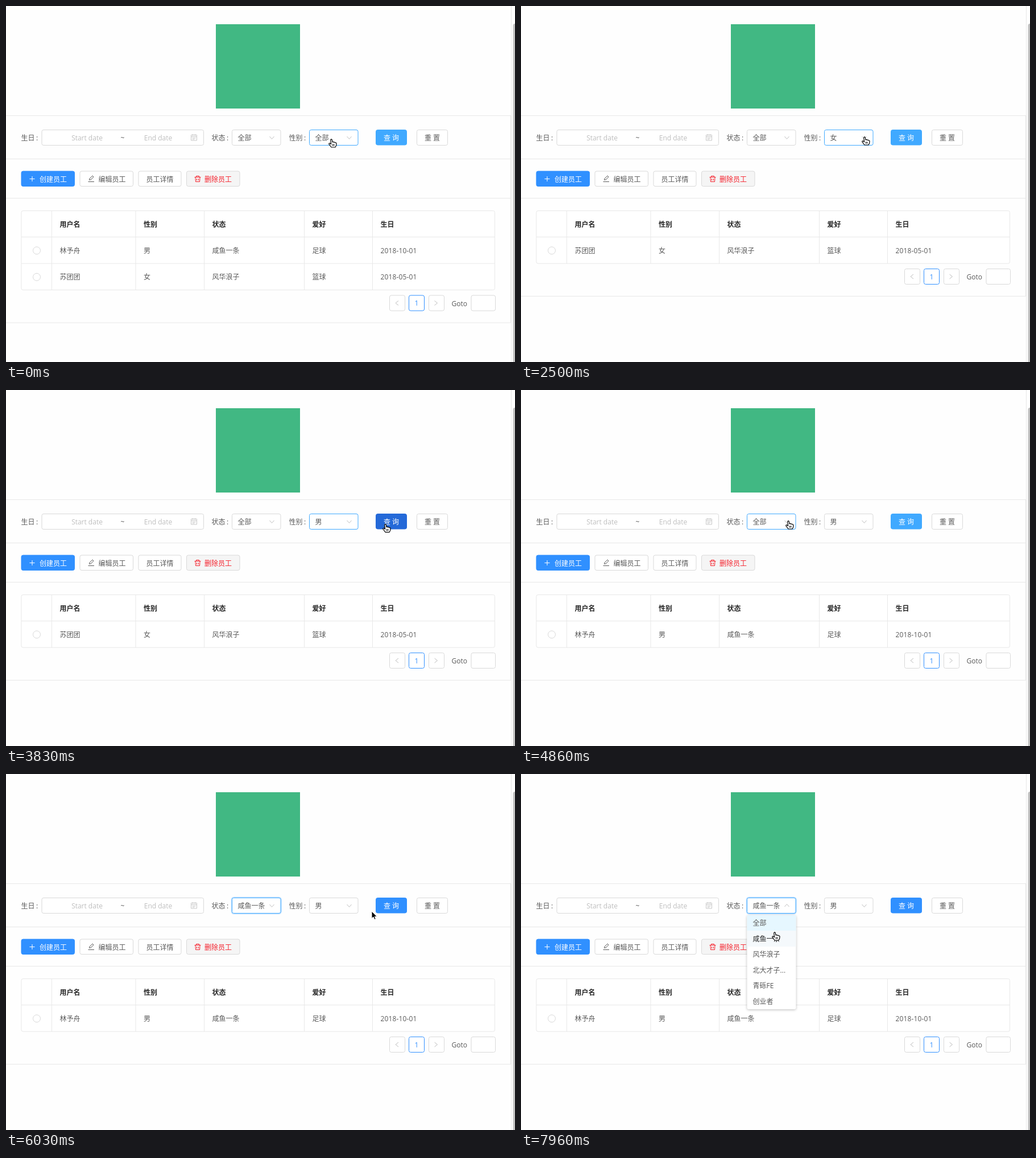
An HTML page that plays this animation: 895 by 625 pixels, repeating every 8 s.

```html
<!DOCTYPE html>
<html lang="zh-CN">
<head>
<meta charset="utf-8">
<title>员工列表</title>
<style>
html, body { margin: 0; width: 100%; height: 100%; overflow: hidden; background: #fefefe; }
svg { display: block; }
text { font: 12px "Open Sans", "Noto Sans CJK SC", "Noto Sans CJK", sans-serif; white-space: pre; }
</style>
</head>
<body>
<svg id="stage" width="895" height="625" viewBox="0 0 895 625"></svg>
<script>
const STEP = 147.2, LOOP = 8000;
const GREY = '#d9d9d9', LINE = '#e8e8e8', INK = '#595959', DARK = '#262626', BLUE = '#3090ff', SKY = '#40a9ff';

const selects = [
  { x: 397.5, label: '状态', options: ['全部', '咸鱼一条', '风华浪子', '北大才子...', '青砾FE', '创业者'] },
  { x: 533.5, label: '性别', options: ['全部', '男', '女'] }
];
// select, step opened, step chosen, chosen option, step of the query click
const picks = [[1, 1, 5, 2, 11], [1, 18, 21, 1, 26], [0, 34, 39, 1, 43], [0, 52, 99, 1, 99]];
const people = [
  ['林予舟', '男', '咸鱼一条', '足球', '2018-10-01'],
  ['苏团团', '女', '风华浪子', '篮球', '2018-05-01']
];
const columns = [80.5, 228, 348.5, 524.5, 644.5];
// step, x, y of the pointer tip
const path = [
  [0, 573, 235], [1, 573, 235], [3, 573, 290], [4, 573, 315], [5, 573, 316], [6, 585, 312], [9, 653, 270],
  [10, 672, 236], [12, 672, 236], [17, 605, 231], [18, 605, 231], [20, 595, 285], [21, 592, 290],
  [25, 668, 237], [28, 668, 236], [33, 471, 231], [34, 471, 231], [37, 446, 288], [39, 450, 290],
  [41, 643, 241], [42, 676, 235], [44, 676, 235], [48, 460, 232], [49, 441, 232], [51, 441, 232],
  [53, 443, 258], [54, 447, 279]
];

const text = (x, y, s, fill = INK, more = '') =>
  `<text x="${x}" y="${y + 4.5}" fill="${fill}" ${more}>${s}</text>`;
const box = (x, y, w, h, stroke = GREY, fill = '#fff', r = 3) =>
  `<rect x="${x}" y="${y}" width="${w}" height="${h}" rx="${r}" fill="${fill}" stroke="${stroke}"/>`;
const draw = (d, stroke, fill = 'none') => `<path d="${d}" stroke="${stroke}" fill="${fill}"/>`;
const middle = 'text-anchor="middle"';

function pointer(n) {
  const i = path.findIndex(p => p[0] >= n), b = path[i], a = path[Math.max(0, i - 1)];
  const k = b[0] > a[0] ? (n - a[0]) / (b[0] - a[0]) : 0;
  return [a[1] + (b[1] - a[1]) * k, a[2] + (b[2] - a[2]) * k];
}

const valueOf = (i, n) =>
  picks.reduce((v, [sel, , chosen, option]) => sel === i && n >= chosen ? option : v, 0);
const openPick = n => picks.find(p => n >= p[1] && n < p[2] + 2);
const inside = ([x, y], left, right, top, bottom) => x >= left && x <= right && y >= top && y <= bottom;

function frame() {
  return `<rect x="369" y="32" width="148" height="148" fill="#41b883"/>` +
    draw('M0 192.5H887.5M0 268.5H887.5M0 337.5H887.5', LINE) + draw('M888.5 0V625', LINE) +
    `<rect x="891.5" y="31" width="7" height="620" rx="3.5" fill="#c1c1c1"/>`;
}

function filters(n, tip) {
  let s = text(26.5, 231, '生日') + text(53, 231, ':') + box(63, 217.5, 284.5, 27) +
    text(142.5, 231, 'Start date', '#bfbfbf', middle) + text(205, 231, '~', INK, middle) +
    text(267.5, 231, 'End date', '#bfbfbf', middle) +
    draw('M325.5 226.5H335.5V236H325.5ZM325.5 229.5H335.5M328.5 225V228M332.5 225V228M327.5 232H333.5M327.5 234H331.5', '#c8c8c8');
  const open = openPick(n);
  selects.forEach(({ x, label, options }, i) => {
    const focus = picks.find(p => p[0] === i && n >= p[1] && n <= p[4]);
    const hover = inside(tip, x, x + 85, 217, 245);
    if (focus && n < focus[4])
      s += `<rect x="${x - .5}" y="217" width="86.5" height="28" rx="4" fill="none" stroke="#1890ff" stroke-opacity=".25" stroke-width="3"/>`;
    const up = open && open[0] === i && n < open[2] ? -1 : 1, c = x + 70;
    s += text(x - 36, 231, label) + text(x - 9.5, 231, ':') +
      box(x, 217.5, 85.5, 27, focus || hover ? SKY : GREY) +
      text(x + 10, 231, options[valueOf(i, n)]) +
      draw(`M${c - 4} ${231 - 2 * up}L${c} ${231 + 2.5 * up}L${c + 4} ${231 - 2 * up}`, '#bfbfbf');
  });
  const clicked = picks.some(p => p[4] === n);
  const light = n < 1 || picks.some((p, i) => n >= p[4] - 1 && n < (picks[i + 1] || [0, 0])[1]);
  const fill = clicked ? '#2469d8' : light ? SKY : BLUE;
  return s + box(650.5, 217.5, 54, 26.5, fill, fill) + text(677.5, 231, '查 询', '#fff', middle) +
    box(722.5, 217.5, 54, 27) + text(749.5, 231, '重 置', INK, middle);
}

function actions() {
  const top = 290, y = 304, h = 26.5;
  return box(27, top, 93.5, h, BLUE, BLUE) + draw('M41.5 303.5H50.5M46 299V308', '#fff') +
    text(59, y, '创建员工', '#fff') +
    box(130, top, 93.5, h) + draw('M146.5 305.5L147 303 152 298 154 300 149 305ZM144.5 308.5H155', INK) +
    text(162.5, y, '编辑员工') +
    box(233, top, 75, h) + text(246.5, y, '员工详情') +
    box(317.5, top, 93.5, h, GREY, '#f5f5f5') +
    draw('M331.5 300.5H342.5M334.5 300V298.5H339.5V300M333 301L333.5 308.5H340.5L341 301M335.5 303V306.5M338.5 303V306.5', '#f5222d') +
    text(349, y, '删除员工', '#f5222d');
}

function table(n) {
  const rows = n < 12 ? people : [people[n < 27 ? 1 : 0]];
  const bottom = 405.5 + 46.5 * rows.length, mid = bottom + 23;
  let s = box(27, 359.5, 832.5, bottom - 359.5, LINE) +
    draw(columns.map(x => `M${x} 359.5V${bottom}`).join(''), LINE);
  ['用户名', '性别', '状态', '爱好', '生日'].forEach((t, i) =>
    s += text(columns[i] + 14, 383, t, DARK, 'style="font-weight:600"'));
  rows.forEach((row, r) => {
    const y = 429.3 + 46.5 * r;
    s += draw(`M27 ${405.5 + 46.5 * r}H859.5`, LINE) +
      `<circle cx="54" cy="${y}" r="6.5" fill="#fff" stroke="${GREY}"/>`;
    row.forEach((t, i) => s += text(columns[i] + 14, y, t, INK, i > 3 ? 'letter-spacing=".15"' : ''));
  });
  const top = mid - 13.5;
  return s + box(674.5, top, 27, 27) + draw(`M690 ${mid - 4}L685 ${mid}L690 ${mid + 4}`, '#bfbfbf') +
    box(708.5, top, 27, 27, BLUE) + text(722, mid, '1', BLUE, middle + ' style="font-weight:500"') +
    box(743.5, top, 27, 27) + draw(`M753.5 ${mid - 4}L758.5 ${mid}L753.5 ${mid + 4}`, '#bfbfbf') +
    text(783.5, mid + .5, 'Goto') + box(818, top, 42.5, 27) +
    draw(`M0 ${bottom + 57.5}H887.5V192`, LINE);
}

function dropdown(n) {
  const pick = openPick(n);
  if (!pick) return '';
  const [sel, from, chosen] = pick, { x, options } = selects[sel];
  const height = 27.5 * options.length, value = valueOf(sel, n);
  const y = pointer(n - 1)[1];
  const active = y < 248 ? valueOf(sel, from) : Math.floor((y - 248) / 27.5);
  const alpha = n === from ? .7 : n < chosen ? 1 : n === chosen ? .7 : .25;
  const scale = n === from || n >= chosen ? .8 + .2 * alpha : 1;
  let s = `<g opacity="${alpha}" transform="translate(0 ${248 * (1 - scale)}) scale(1 ${scale})">` +
    `<rect x="${x}" y="248" width="86" height="${height}" rx="3" fill="#fff" style="filter:drop-shadow(0 1px 2px #0004)"/>`;
  options.forEach((t, i) => {
    const top = 248 + 27.5 * i, bg = i === active ? '#e6f7ff' : i === value ? '#f5f9fc' : '';
    if (bg) s += `<rect x="${x}" y="${top}" width="86" height="27.5" fill="${bg}"/>`;
    s += text(x + 10, top + 13.7, t, i === value ? DARK : INK, i === value ? 'style="font-weight:500"' : '');
  });
  return s + '</g>';
}

function cursor(n, tip) {
  const pick = openPick(n), list = pick && selects[pick[0]];
  const hand = selects.some(({ x }) => inside(tip, x, x + 85, 217, 245)) ||
    inside(tip, 650, 705, 217, 245) ||
    list && inside(tip, list.x, list.x + 86, 248, 248 + 27.5 * list.options.length);
  const shape = hand
    ? draw('M-2.3 0Q-1 -2 .3 -.2L1 4Q2.4 2.6 3.6 4.4Q5 3.4 6 5Q8 4.6 8 6.4L7.6 10 6 13H-1L-5 7.6Q-5.6 5.6 -3.6 6L-1.4 7.6ZM1.5 7.5V10.5M3.7 7.5V10.5', '#000', '#fff')
    : draw('M0 0V12.5L3 10 5 14.5 7.2 13.5 5.3 9.3H9.3Z', '#fff', '#000');
  return `<g transform="translate(${tip})" stroke-linejoin="round" stroke-width="${hand ? 1.2 : 1}">${shape}</g>`;
}

const stage = document.getElementById('stage');
let shown = -1;
function tick() {
  const t = performance.now() % LOOP;
  const n = Math.min(54, Math.floor((t + 8) / STEP));
  if (n !== shown) {
    shown = n;
    const tip = pointer(n);
    stage.innerHTML = frame() + filters(n, tip) + actions() + table(n) + dropdown(n) + cursor(n, tip);
  }
  requestAnimationFrame(tick);
}
tick();
</script>
</body>
</html>
```
